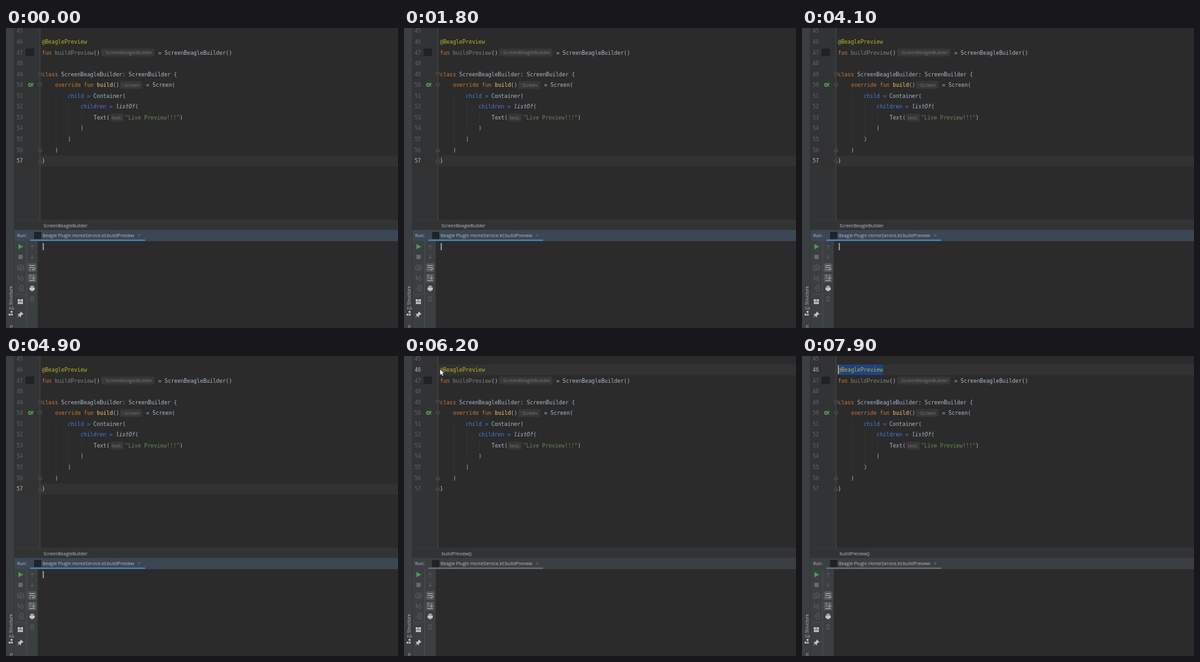
These frames come from a looping animation (600 px wide and 459 px high, 8000 ms). An HTML page:

```html
<!DOCTYPE html>
<html lang="en">
<head>
<meta charset="utf-8">
<title>Live preview editor</title>
<style>
  html, body { margin: 0; width: 100%; height: 100%; overflow: hidden; background: #2b2b2b; }
  svg { display: block; width: 600px; height: 459px; }
  text { white-space: pre; fill: #a9b7c6; }
  .code { font: 8.18px "DejaVu Sans Mono", monospace; }
  .num { text-anchor: end; fill: #606366; }
  .num.on { fill: #b5b5b5; }
  .ui { font: 7px "Open Sans", sans-serif; fill: #bbbbbb; }
  .hint { font: 7.5px "Open Sans", sans-serif; fill: #787878; }
  .kw { fill: #cc7832; }
  .note { fill: #bbb529; }
  .fn { fill: #ffc66d; }
  .arg { fill: #467cda; }
  .str { fill: #6a8759; }
  .dim { fill: #808080; }
  .it { font-style: italic; }
  .line { fill: none; stroke: #afb1b3; stroke-width: 1; }
  .off { opacity: .28; }
</style>
</head>
<body>
<svg id="stage" viewBox="0 0 600 459"></svg>
<script>
const LOOP = 8000, FOCUS = 5500, CRUMB = 5900, SELECT = 6500;
const stage = document.getElementById('stage');
const rowY = n => 21 + (n - 46) * 16.56;

const rect = (x, y, w, h, fill, more = '') =>
  `<rect x="${x}" y="${y}" width="${w}" height="${h}" fill="${fill}" ${more}/>`;
const path = (d, cls = 'line', more = '') => `<path d="${d}" class="${cls}" ${more}/>`;
const text = (x, y, s, cls, more = '') => `<text x="${x}" y="${y}" class="${cls}" ${more}>${s}</text>`;
const span = (cls, s) => `<tspan class="${cls}">${s}</tspan>`;
const code = (n, x, s) => text(x, rowY(n) + 3, s, 'code');
const hint = (n, x, w, s) =>
  rect(x, rowY(n) - 6, w, 12, '#373737', 'rx="2"') + text(x + 2.5, rowY(n) + 2.6, s, 'hint');

function panels() {
  return rect(0, 0, 600, 459, '#2b2b2b')
    + rect(13, 0, 39, 294, '#313335')
    + rect(13, 195.3, 587, 16.2, '#323232', 'id="row57"')
    + rect(13, 13, 587, 16.2, '#323232', 'id="row46"')
    + rect(51.5, 0, 1, 294, '#484848')
    + rect(13, 294, 587, 15, '#313335')
    + rect(13, 293.6, 587, .8, '#3a3c3e')
    + rect(13, 309, 587, 17, '#3c3f41', 'id="head"')
    + rect(13, 326, 36, 133, '#3c3f41')
    + rect(31, 326, .8, 133, '#505355')
    + rect(48.3, 326, .8, 133, '#323232')
    + rect(0, 0, 13, 459, '#3c3f41')
    + rect(12.2, 0, .8, 459, '#303234');
}

function gutter() {
  let s = '';
  for (let n = 45; n <= 57; n++)
    s += text(26, rowY(n) + 3, n, 'code num', `id="n${n}"`);
  for (const n of [49, 50, 56, 57]) {
    const y = rowY(n), d = n < 52 ? 1 : -1;
    s += `<path d="M49.5 ${y - 2.5 * d}h5v${3 * d}l-2.5 ${2 * d}l-2.5 ${-2 * d}z" fill="#2b2b2b" stroke="#606366" stroke-width=".7"/>`
      + path(`M51 ${y}h2`, 'line', 'style="stroke:#777;stroke-width:.7"');
  }
  s += rect(30, 31.5, 13, 11.5, '#202326');
  s += '<circle cx="36.8" cy="87" r="3.1" fill="#4a9150"/><circle cx="36.8" cy="87" r="1.1" fill="#313335"/>'
    + path('M40.7 90v-6m-1.5 2l1.5-2l1.5 2', 'line', 'style="stroke:#62a966;stroke-width:.9"');
  return s;
}

function source() {
  const guides = [[76, 51, 55], [95.5, 52, 54], [115, 53, 53]].map(([x, a, b]) =>
    rect(x, rowY(a) - 8, .7, (b - a + 1) * 16.56, '#373737')).join('');
  return guides
    + rect(55, 13, 69, 16, '#214283', 'id="pick"')
    + code(46, 55, span('note', '@BeaglePreview'))
    + code(47, 55, span('kw', 'fun ') + span('dim', 'buildPreview') + '()')
    + hint(47, 145.5, 82, ': ScreenBeagleBuilder')
    + code(47, 233, '= ScreenBeagleBuilder()')
    + code(49, 55, span('kw', 'class ') + 'ScreenBeagleBuilder: ScreenBuilder {')
    + code(50, 75, span('kw', 'override fun ') + span('fn', 'build') + '()')
    + hint(50, 174.5, 34, ': Screen')
    + code(50, 214.5, '= Screen(')
    + code(51, 94.5, span('arg', 'child = ') + 'Container(')
    + code(52, 114, span('arg', 'children = ') + span('it', 'listOf') + '(')
    + code(53, 134, 'Text(')
    + hint(53, 159.5, 20.5, 'text:')
    + code(53, 182, span('str', '"Live Preview!!!"') + ')')
    + code(54, 114, ')') + code(55, 94.5, ')') + code(56, 75, ')') + code(57, 55, '}')
    + rect(55, 14, 1, 14, '#d0d0d0', 'id="caret"');
}

function runPanel() {
  return text(57.5, 304.5, '', 'ui', 'id="crumb"')
    + text(17, 320, 'Run:', 'ui')
    + rect(43, 312, 11, 11, '#202326')
    + text(56, 320, 'Beagle Plugin HomeService.kt:buildPreview', 'ui')
    + path('M202 315.5l3.6 3.6m0-3.6l-3.6 3.6', 'line', 'style="stroke:#71767a;stroke-width:.8"')
    + rect(37, 323.7, 176, 2, '#4a88c7', 'id="under"')
    + rect(56.4, 329, 1.3, 11, '#c8c8c8', 'id="prompt"');
}

function tools() {
  const press = y => rect(33.5, y, 13, 13, '#55585a', 'rx="2"');
  return '<path d="M19 330.5l7.5 4l-7.5 4z" fill="#499c54"/>'
    + rect(19, 347, 6.5, 6.5, '#67696b')
    + `<g class="off">`
    + path('M18 364h2l1-1.5h3l1 1.5h2v6h-9z') + '<circle cx="22.5" cy="367" r="1.6" class="line"/>'
    + path('M19 386v-6m0 3h4m-3-3l-2-1m5 2l2-2') + '<circle cx="24" cy="384" r="2.3" class="line"/>'
    + path('M21 394h5v8h-5m-3-4h5m-2-2l2 2l-2 2')
    + path('M40 338v-6m-2.4 2.4l2.4-2.4l2.4 2.4M40 347v6m-2.4-2.4l2.4 2.4l2.4-2.4')
    + path('M37 412h6m-5 1v5h4v-5m-3-2h2')
    + '</g>'
    + press(360) + path('M36 363.5h8m-8 3h6.5q1.8 0 1.8 1.6t-1.8 1.6h-2m1.5-1.5l-1.5 1.5l1.5 1.5M36 369.7h2')
    + press(376) + path('M36 379h3m-3 7.5h8m-8-4h2m4-4v6m-2.2-2.2l2.2 2.2l2.2-2.2')
    + rect(37.5, 394.5, 5, 2, '#c1c3c5') + rect(36, 397, 8, 4, '#c1c3c5') + rect(38, 399.5, 4, 3, '#c1c3c5')
    + rect(15.5, 407.5, 14, .7, '#55585a')
    + rect(18, 415, 3.6, 3.5, '#c1c3c5') + rect(22.4, 415, 3.6, 3.5, '#c1c3c5') + rect(18, 419.3, 8, 3, '#c1c3c5')
    + '<path d="M22.7 433.8l4 4l-1 .6l-.8-.2l-2 2l.1 1.5l-.8.8l-1.9-1.9l-2.2 2.2l-.6-.6l2.2-2.2l-1.8-1.8l.8-.8l1.5.1l2-2l-.2-.8z" fill="#c1c3c5"/>'
    + text(0, 0, '<tspan text-decoration="underline">Z</tspan>: Structure', 'ui',
        'transform="translate(10 431) rotate(-90)" style="font-size:6.7px"')
    + rect(7, 433, 3, 2.7, '#c1c3c5') + rect(4, 437.2, 2.7, 2.7, '#c1c3c5') + rect(7.5, 437.2, 2.7, 2.7, '#c1c3c5')
    + text(0, 0, 'Favorites', 'ui', 'transform="translate(10 454.5) rotate(-90)" text-anchor="end"');
}

stage.innerHTML = panels() + gutter() + source() + runPanel() + tools()
  + '<path id="mouse" d="M0 0v9.4l2.2-2l1.5 3.4l1.7-.8l-1.5-3.2h3z" fill="#fff" stroke="#222" stroke-width=".6"/>';

const el = id => document.getElementById(id);
const [mouse, caret, prompt, pick, crumb, head, under, row46, row57, n46, n57] =
  ['mouse', 'caret', 'prompt', 'pick', 'crumb', 'head', 'under', 'row46', 'row57', 'n46', 'n57'].map(el);
const show = (node, on) => node.setAttribute('visibility', on ? 'visible' : 'hidden');

// Pointer visits: each is a list of [time, x, y].
const visits = [
  [[2100, 552, 262], [2500, 185, 69], [2800, 185, 69], [3200, 414, 190]],
  [[5000, 300, 130], [5400, 55, 20], [7300, 55, 20]]
];

function pointer(t) {
  const v = visits.find(p => t >= p[0][0] && t < p[p.length - 1][0]);
  if (!v) return null;
  const i = v.findIndex(p => p[0] > t), [t0, x0, y0] = v[i - 1], [t1, x1, y1] = v[i];
  const k = (t - t0) / (t1 - t0), e = k * k * (3 - 2 * k);
  return [x0 + (x1 - x0) * e, y0 + (y1 - y0) * e];
}

function draw(t) {
  const editing = t >= FOCUS;
  show(prompt, !editing && (t + 250) % 1000 < 500);
  show(caret, editing && (t - FOCUS) % 1000 < 500);
  show(pick, t >= SELECT);
  show(row46, editing);
  show(row57, !editing);
  n46.classList.toggle('on', editing);
  n57.classList.toggle('on', !editing);
  head.setAttribute('fill', editing ? '#3c3f41' : '#3b4754');
  under.setAttribute('fill', editing ? '#6b7278' : '#4a88c7');
  crumb.textContent = t < CRUMB ? 'ScreenBeagleBuilder' : 'buildPreview()';
  const at = pointer(t);
  show(mouse, at);
  if (at) mouse.setAttribute('transform', `translate(${at})`);
}

const start = performance.now();
function tick() {
  const t = (performance.now() - start) % LOOP;
  draw(Math.floor(t / 100) * 100);
  requestAnimationFrame(tick);
}
tick();
</script>
</body>
</html>
```
